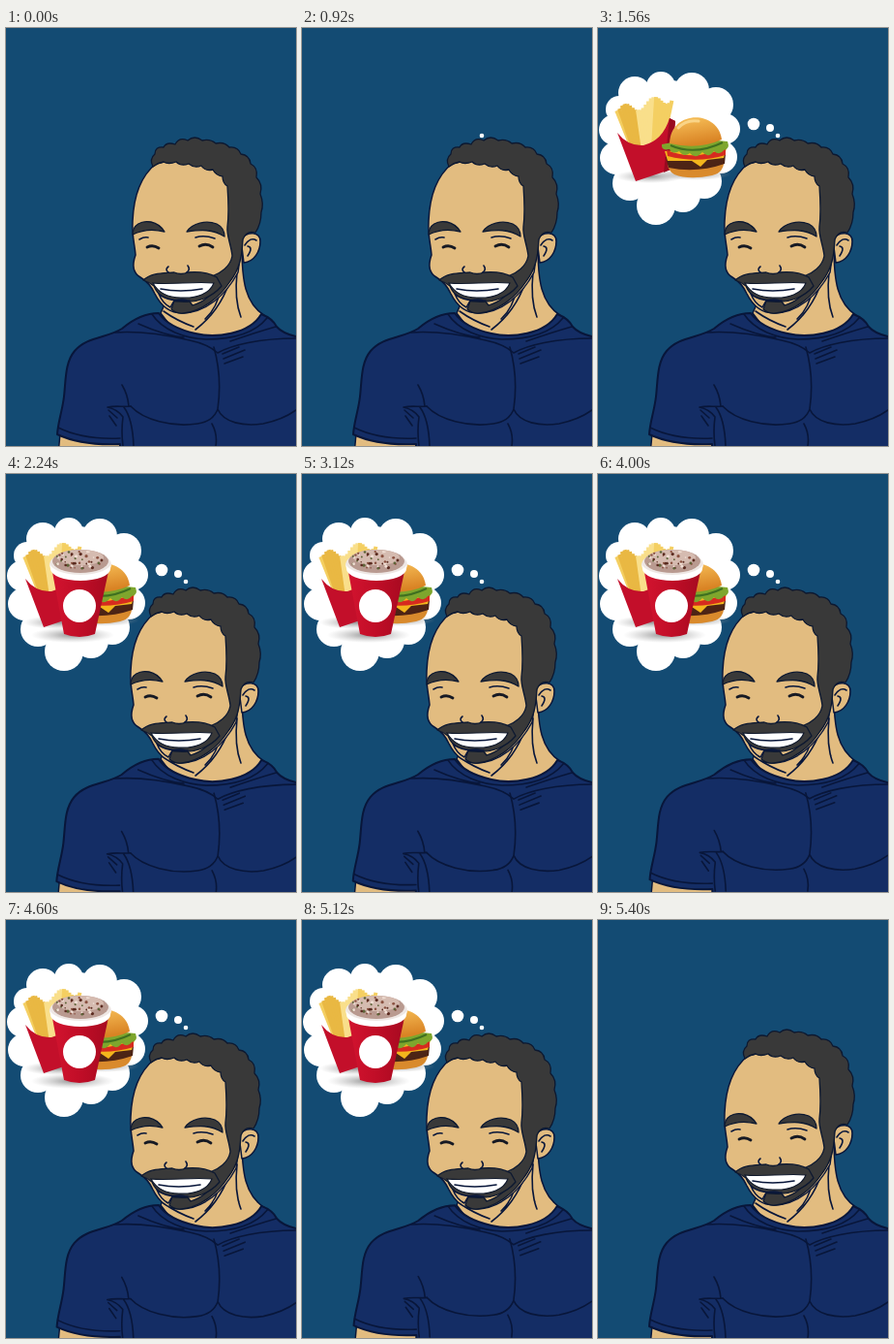
These frames come from a looping animation (300 px wide and 431 px high, 5440 ms). An HTML page:

```html
<!DOCTYPE html>
<html lang="en">
<head>
<meta charset="utf-8">
<title>Daydream</title>
<style>
html, body { margin: 0; width: 100%; height: 100%; overflow: hidden; background: #134b73; }
svg { display: block; width: 100%; height: 100%; }
.ink { fill: none; stroke: #08163a; stroke-width: 1.6; stroke-linecap: round; stroke-linejoin: round; }
.skin { fill: #e2bc80; stroke: #08163a; stroke-width: 1.5; stroke-linejoin: round; }
.hair { fill: #393939; stroke: #0c1830; stroke-width: 1.3; stroke-linejoin: round; }
</style>
</head>
<body>
<svg viewBox="0 0 300 431">
  <defs>
    <linearGradient id="bun" x1="0" y1="0" x2="0.3" y2="1">
      <stop offset="0" stop-color="#f9c45c"/><stop offset="1" stop-color="#d98324"/>
    </linearGradient>
    <linearGradient id="cupRed" x1="0" x2="1">
      <stop offset="0" stop-color="#d3142f"/><stop offset=".5" stop-color="#c00d27"/><stop offset="1" stop-color="#a60a20"/>
    </linearGradient>
    <radialGradient id="shade">
      <stop offset="0" stop-color="#777" stop-opacity=".8"/><stop offset="1" stop-color="#aaa" stop-opacity="0"/>
    </radialGradient>
  </defs>
  <rect width="300" height="431" fill="#134b73"/>

  <path class="skin" d="M244 225 C244 260 247 284 268 297 L246 322 L180 320 L160 294 L168 276Z"/>
  <path class="ink" d="M231 262 Q221 292 196 311 M222 268 Q219 288 206 300 M163 292 Q177 302 194 308 M239 252 Q236 280 243 298" stroke-width="1.1"/>

  <g id="torso">
    <path class="skin" d="M56 418 L54 440 H124 L120 424Z"/>
    <path d="M158 294 C146 294 133 299 120 310 C104 320 84 318 71 333 C61 345 62 362 60 380 C58 396 54 405 53 419 C70 427 95 430 118 429 L118 445 H310 V320 C296 318 286 315 280 308 C277 302 272 298 264 295 C252 316 216 320 196 315 C178 311 165 304 158 294Z"
      fill="#142d65" stroke="#08163a" stroke-width="2" stroke-linejoin="round"/>
    <path class="ink" d="M151 295 C162 312 185 320 207 321 C235 321 258 314 270 299"/>
    <path class="ink" d="M113 314 C140 312 168 317 190 322 Q209 326 219 335 C233 327 262 320 300 320 M137 305 Q164 317 184 319 M232 323 Q258 314 279 308"/>
    <path class="ink" d="M215 329 C221 350 222 372 219 393 Q214 406 198 408 C172 412 142 404 129 390 M219 393 C225 407 246 411 266 408 Q286 404 300 394"/>
    <path class="ink" d="M129 390 C121 391 114 389 105 391 Q115 393 121 401 Q119 416 121 431 M122 391 Q131 403 132 431 M127 390 Q126 378 120 368 M54 412 C72 421 94 424 118 423 M213 408 Q219 419 217 431"/>
    <path class="ink" stroke-width="1" d="M224 336 L241 329 M225 341 L247 332 M226 346 L245 339 M106 394 L115 402 M107 400 L114 410"/>
  </g>

  <g id="head">
    <path class="skin" d="M243 218 C250 209 263 210 263 220 C263 230 257 241 246 242Z"/>
    <path class="ink" stroke-width="1.1" d="M247 224 Q253 215 259 219 M250 225 Q256 226 250 235"/>
    <path class="skin" d="M155 140 C139 153 132 175 131 199 C130 214 133 222 134 234 C130 245 132 253 139 257 Q149 263 154 274 C160 286 169 294 182 294 C206 294 227 276 240 252 L247 200 L229 150 L190 132Z"/>
    <path class="hair" d="M152 143 Q148 135 154 130 Q154 122 163 123 Q166 117 175 120 Q179 112 188 116 Q195 110 203 116 Q211 114 217 119 Q226 117 231 123 Q240 122 243 130 Q252 131 253 140 Q261 144 259 154 Q266 161 263 171 Q267 181 264 190 Q264 202 258 211 Q249 208 245 218 C244 238 241 249 232 261 C221 278 203 292 184 294 Q177 295 171 290 L174 281 H189 L193 286 C206 282 214 274 218 264 L213 256 C222 253 232 246 234 235 C233 224 228 214 229 205 C231 190 230 177 229 163 Q224 160 224 153 Q217 152 214 146 Q206 148 202 142 Q195 145 189 140 Q181 143 176 138 Q168 141 163 138 Q157 139 152 143Z"/>
    <path class="hair" d="M142 260 C151 252 163 253 174 252 Q181 255 188 252 C199 251 209 252 218 257 L223 266 C213 278 197 284 181 282 C166 282 157 276 153 266 Q148 262 142 260Z"/>
    <path class="skin" stroke-width="1" d="M158 274 C166 282 180 281 190 281 L188 281 Q182 279 174 281 L170 288 Q162 284 158 274Z"/>
    <path d="M152 263 C170 265 195 261 215 263 C211 274 197 279 181 278 C166 278 157 272 152 263Z" fill="#fff" stroke="#111a2c" stroke-width="1.2"/>
    <path class="ink" stroke-width=".8" d="M160 269 Q180 273 203 269"/>
    <path class="hair" d="M131 213 C131 203 140 198 150 200 Q159 202 164 210 C152 207 141 208 131 213Z M187 210 C193 201 207 198 218 202 Q226 206 226 215 C214 207 201 208 187 210Z"/>
    <path class="ink" stroke-width="2.4" d="M146 226 Q152 223 158 227 M200 225 Q207 221 214 226" style="stroke:#171a24;stroke-width:2.8"/>
    <path class="ink" stroke-width="1" d="M168 246 Q164 249 168 252 M188 245 Q191 249 187 252 M138 218 Q143 215 147 216 M196 216 Q205 213 216 217"/>
  </g>

  <g id="dream">
    <circle cx="186" cy="111" r="2.3" fill="#fff" data-at="920"/>
    <circle cx="178" cy="103" r="4" fill="#fff" data-at="1000"/>
    <circle cx="161" cy="99" r="6.3" fill="#fff" data-at="1080"/>
    <g id="cloud" fill="#fff" data-at="1160"><ellipse cx="73" cy="116" rx="60" ry="62"/></g>
    <g data-at="1360">
      <ellipse cx="54" cy="153" rx="36" ry="7" fill="url(#shade)"/>
      <g id="fries" fill="none" stroke-linecap="square"></g>
      <path d="M20 108 Q31 122 47 121 Q67 116 74 93 L80 96 L75 146 L39 158Z" fill="#c30f2a"/>
      <path d="M74 93 L80 96 L75 146 L68 149Z" fill="#990a20"/>
    </g>
    <g data-at="1560">
      <ellipse cx="100" cy="151" rx="38" ry="6" fill="url(#shade)"/>
      <path d="M72 139 L130 136 Q131 149 118 152 Q94 157 79 151 Q72 147 72 139Z" fill="#d98a2c"/>
      <path d="M70 133 Q99 140 132 130 L131 140 Q102 150 73 144Z" fill="#4d2415"/>
      <path d="M69 127 L133 124 L130 134 L113 136 L106 143 L97 137 L72 137Z" fill="#f3b51c"/>
      <path d="M71 126 Q101 138 132 123 L132 131 Q103 140 72 132Z" fill="#d62b1f"/>
      <path d="M66 120 Q98 113 134 117 Q137 125 130 126 Q126 132 120 127 Q114 135 108 128 Q101 136 95 129 Q89 134 84 127 Q77 131 74 125 Q65 127 66 120Z" fill="#7ea62d"/>
      <path d="M75 121 Q100 132 129 118" fill="none" stroke="#3f7020" stroke-width="2"/>
      <path d="M74 119 C75 84 124 84 128 115 Q104 126 74 119Z" fill="url(#bun)"/>
      <path d="M83 103 Q91 94 104 96" fill="none" stroke="#fde2a0" stroke-width="3" stroke-linecap="round" opacity=".7"/>
    </g>
    <g data-at="1760">
      <ellipse cx="69" cy="166" rx="43" ry="8" fill="url(#shade)"/>
      <path d="M47 96 L60 165 Q76 171 92 165 L107 96Z" fill="url(#cupRed)"/>
      <ellipse cx="77" cy="93" rx="32" ry="13" fill="#eee7e4"/>
      <path d="M45 91 A32 13 0 0 0 109 91 L108 98 A31 12 0 0 1 46 98Z" fill="#fff"/>
      <ellipse cx="77" cy="90" rx="29" ry="12" fill="#b99a90"/>
      <ellipse cx="77" cy="86" rx="24" ry="8" fill="#d5bbb0"/>
      <g id="bits"></g>
      <circle cx="76" cy="136" r="17" fill="#fff"/>
    </g>
  </g>
</svg>
<script>
const $ = id => document.getElementById(id);
const LOOP = 5440;

function add(parent, tag, attrs) {
  const el = document.createElementNS("http://www.w3.org/2000/svg", tag);
  for (const k in attrs) el.setAttribute(k, attrs[k]);
  $(parent).append(el);
}

[[38, 67, 17], [65, 60, 15], [97, 64, 18], [122, 79, 18], [131, 104, 16], [127, 133, 17], [110, 158, 18],
 [88, 172, 18], [60, 183, 20], [33, 160, 18], [19, 134, 17], [17, 105, 16], [22, 84, 14]]
  .forEach(([cx, cy, r]) => add("cloud", "circle", { cx, cy, r }));

for (let i = 0; i < 22; i++) {
  const u = (i * 7 % 22) / 21;
  const top = [20 + 56 * u, 87 - 13 * u + 5 * Math.sin(i * 2.3)];
  add("fries", "path", {
    d: `M${33 + 34 * u} 119 L${top}`,
    stroke: ["#f4cf62", "#e9b843", "#f9df8b"][i % 3],
    "stroke-width": 4
  });
}

let seed = 5;
const rnd = () => (seed = seed * 16807 % 2147483647) / 2147483647;
for (let i = 0; i < 46; i++) {
  const a = rnd() * 6.283, r = Math.sqrt(rnd());
  add("bits", "circle", {
    cx: 77 + 27 * r * Math.cos(a), cy: 89 + 10 * r * Math.sin(a), r: 0.7 + rnd(),
    fill: ["#5b2b20", "#8a5140", "#f0ded4", "#5e6438"][i % 4]
  });
}

const ramp = (t, a, b) => {
  const u = Math.min(1, Math.max(0, (t - a) / (b - a)));
  return u * u * (3 - 2 * u);
};
const parts = [...document.querySelectorAll("[data-at]")];

function draw(now) {
  const t = Math.floor(now % LOOP / 40) * 40;
  for (const p of parts) p.style.display = t >= +p.dataset.at ? "" : "none";

  const back = 1 - ramp(t, 5200, 5400);
  $("dream").setAttribute("opacity", back);

  const pose = ramp(t, 1880, 2200) * back;
  $("head").setAttribute("transform", `translate(${-2 * pose} ${4 * pose})`);

  // Slow breathing, pinned at the shoulders
  const breath = pose * Math.sin((t - 1920) / 1120 * 2 * Math.PI);
  $("torso").setAttribute("transform",
    `translate(190 311) scale(${1 + 0.005 * breath} ${1 + 0.01 * breath}) translate(-190 -311)`);
}

const start = performance.now();
function tick() {
  draw(performance.now() - start);
  requestAnimationFrame(tick);
}
tick();
</script>
</body>
</html>
```
